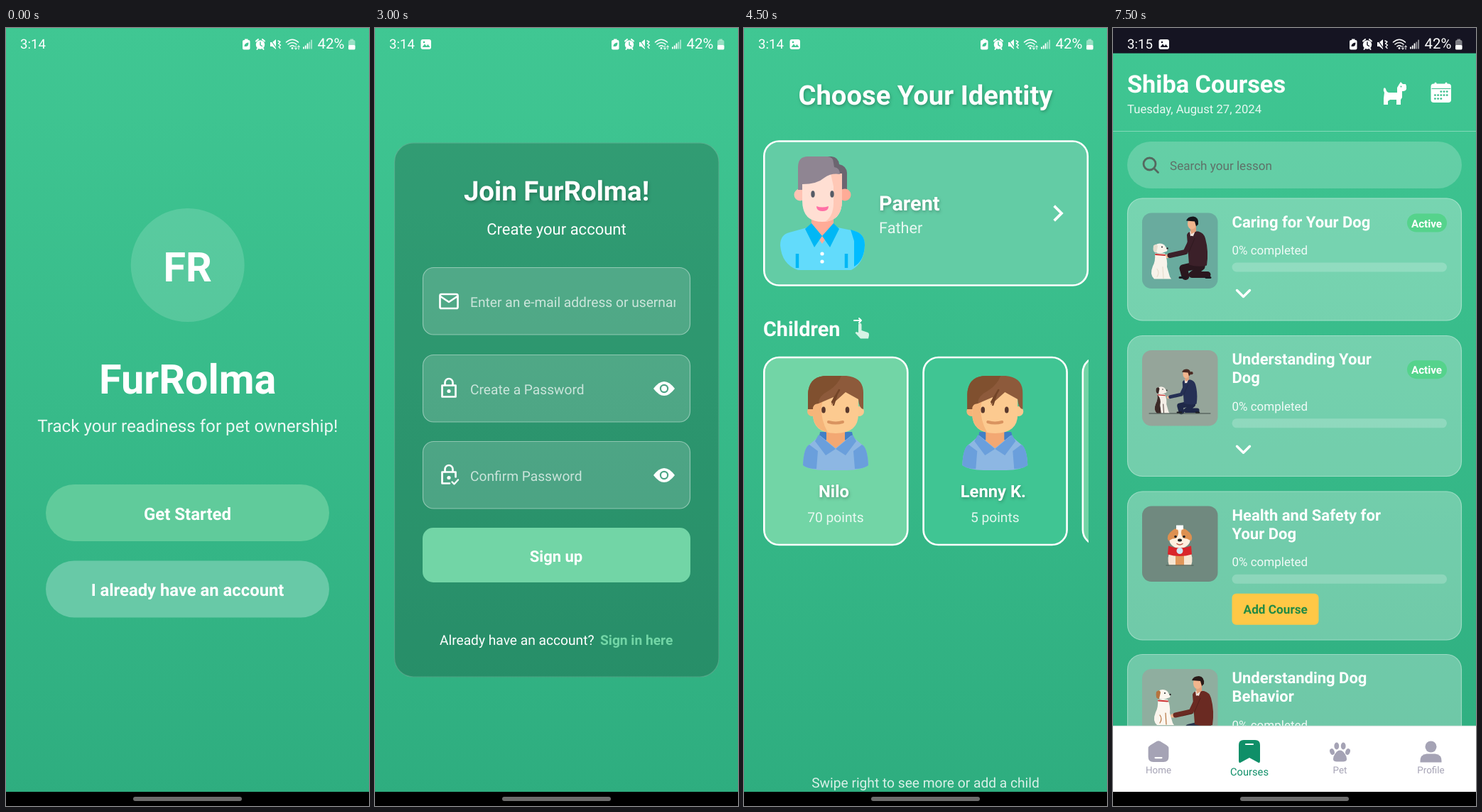
Animation, 511 px wide and 1096 px high, one loop 8 s. Source, as an HTML page:

```html
<!DOCTYPE html>
<html lang="en">
<head>
<meta charset="utf-8">
<title>Pet care app tour</title>
<style>
html, body { margin: 0; height: 100%; overflow: hidden; background: #000; }
svg { display: block; width: 100vw; height: 100vh; }
text { font-family: Roboto, sans-serif; text-rendering: geometricPrecision; white-space: pre; }
.soft { filter: drop-shadow(1px 2px 2px rgba(0,0,0,.25)); }
.lift { filter: drop-shadow(0 2px 3px rgba(0,0,0,.3)); }
</style>
</head>
<body>
<svg viewBox="0 0 511 1096">
  <defs>
    <linearGradient id="bg" x1="0" y1="0" x2="0" y2="1">
      <stop offset="0" stop-color="#40c793"/><stop offset="1" stop-color="#2ead7f"/>
    </linearGradient>
    <clipPath id="row"><rect y="440" width="485" height="300"/></clipPath>
    <clipPath id="field"><rect x="134" y="337" width="289" height="95"/></clipPath>
  </defs>
  <rect width="511" height="1096" fill="url(#bg)"/>
  <g id="screen"></g>
  <rect y="1076" width="511" height="20"/>
  <rect x="179" y="1083" width="153" height="6" rx="3" fill="#6c6c6c"/>
</svg>
<script>
const SCREEN_MS = 1500, LOOP_MS = 8000;
const APP = 'FurRolma', KID = 'Nilo', FRIEND = 'Lenny K.';
const WHITE = '#fff', MINT = '#72d5a6', BLUE = '#0a7ae6', GREEN = '#34c759', ORANGE = '#ff9500';
const veil = a => `rgba(255,255,255,${a})`;

// Drawing helpers, each returning SVG markup
const text = (x, y, s, size, weight = 400, fill = WHITE, anchor = 'start', extra = '') =>
  `<text x="${x}" y="${y}" font-size="${size}" font-weight="${weight}" fill="${fill}" text-anchor="${anchor}" ${extra}>${s}</text>`;
const mid = (x, y, s, size, weight, fill, extra) => text(x, y, s, size, weight, fill, 'middle', extra);
const rect = (x, y, w, h, r, fill, extra = '') =>
  `<rect x="${x}" y="${y}" width="${w}" height="${h}" rx="${r}" fill="${fill}" ${extra}/>`;
const circle = (x, y, r, fill, extra = '') => `<circle cx="${x}" cy="${y}" r="${r}" fill="${fill}" ${extra}/>`;
const oval = (x, y, rx, ry, fill, extra = '') =>
  `<ellipse cx="${x}" cy="${y}" rx="${rx}" ry="${ry}" fill="${fill}" ${extra}/>`;
const shape = (d, fill = WHITE, extra = '') => `<path d="${d}" fill="${fill}" ${extra}/>`;
const line = (d, color = WHITE, width = 3, cap = 'round') =>
  `<path d="${d}" fill="none" stroke="${color}" stroke-width="${width}" stroke-linecap="${cap}" stroke-linejoin="${cap === 'round' ? cap : 'miter'}"/>`;
const border = (color, width = 1.2) => `stroke="${color}" stroke-width="${width}"`;
const at = (x, y, s, scale = 1) => `<g transform="translate(${x} ${y}) scale(${scale})">${s}</g>`;

function statusBar(clock, picture = true, dark = false) {
  const ink = dark ? '#151422' : '#3fc592';
  return (dark ? rect(0, 0, 511, 35.6, 0, ink) : '') + text(20, 29.3, clock, 18.6) +
    (picture ? rect(64.5, 16, 14.5, 14, 3, WHITE) + shape('M66.5 27l3.5-4.5 2.5 3 2-2.5 3 4z', ink) + circle(69, 20, 1.3, ink) : '') +
    rect(333, 17, 10.5, 13.5, 2, WHITE) + rect(336, 15.5, 4.5, 2, 0, WHITE) + shape('M335.5 26q0-5 6-5.5q0 6-4.5 5.5z', ink) +
    circle(358, 23.5, 6.2, WHITE) + line('M352 18.5l3-2.5M364 18.5l-3-2.5M353.5 30l1.5-2M362.5 30l-1.5-2', WHITE, 2) +
    line('M358 20v4l2.5 1.5', ink, 1.4) +
    shape('M372 20h3l5-4v14l-5-4h-3z') + line('M372 16l9 13', ink, 1.2) + line('M383 18l3 1.5-2.5 2.5 3 2-2.5 2.5 2 2', WHITE, 1.4) +
    line('M394.5 20q8.5-7.5 17 0M397 23q6-5 12 0M400 26q3-2.5 6 0', WHITE, 1.6) + circle(403, 28.5, 1.4, WHITE) +
    line('M408 25v5m-1.5-1.5l1.5 1.5 1.5-1.5M412 30v-5m-1.5 1.5l1.5-1.5 1.5 1.5', WHITE, 1) +
    [3, 5, 8, 10, 13].map((h, i) => rect(418 + i * 2.8, 29.5 - h, 1.8, h, .5, i < 3 ? WHITE : veil(.55))).join('') +
    text(438.5, 29.3, '42%', 20.4) + rect(482, 17, 9.5, 13, 2, veil(.45)) + rect(484.5, 15.5, 4.5, 2, 0, veil(.45)) +
    rect(482, 24, 9.5, 6.5, 1.5, WHITE);
}

// Sign-in and sign-up forms
const eye = y => shape(`M392 ${y}q15-20 30 0q-15 20-30 0z`) + circle(407, y, 6.2, '#4ea586') + circle(407, y, 4, WHITE);
const mail = y => rect(91.5, y - 10, 25, 20, 2, 'none', border(WHITE, 2.7)) + line(`M92 ${y - 7}l12 8 12-8`, WHITE, 2.7);
const lock = (y, checked) =>
  line(checked ? `M105 ${y + 11.5}h-10.5v-16h19v7` : `M94.5 ${y - 4.5}h19v16h-19z`, WHITE, 2.7) +
  line(`M98.5 ${y - 5}v-3.5a5.5 5.5 0 0 1 11 0v3.5`, WHITE, 2.7) + circle(104, y + 3.5, 2.6, WHITE) +
  (checked ? line(`M108.5 ${y + 9.5}l3 3 5.5-6`, WHITE, 2.4) : '');
const field = (y, icon, label, secret) =>
  rect(67.5, y + .5, 376, 94.5, 15, veil(.16), border(veil(.42))) + icon +
  text(134, y + 55.5, label, 19.2, 400, veil(.7)) + (secret ? eye(y + 48) : '');
const panel = (top, bottom, title, subtitle) =>
  rect(27, top, 457.5, bottom - top, 27, 'rgba(0,0,0,.2)') +
  rect(27.5, top + .5, 456.5, bottom - top - 1, 26.5, 'none', border(veil(.18))) +
  mid(255.5, top + 81.5, title, 38.4, 700, WHITE, 'class="soft"') + mid(255.5, top + 129.5, subtitle, 22);
const bigButton = (y, label) => rect(67, y, 377, 77, 15, MINT) + mid(255, y + 48, label, 22, 700);

const welcome = () => statusBar('3:14', false) +
  circle(255.7, 334, 80, veil(.15)) + mid(255.7, 357, 'FR', 57.5, 700) +
  mid(255.7, 515, APP, 57.5, 700) + mid(255.7, 569, 'Track your readiness for pet ownership!', 24.2, 400, veil(.9)) +
  rect(56, 643, 399, 80, 40, '#60cb9b') + mid(255.5, 693, 'Get Started', 24, 700) +
  rect(56, 750.5, 399, 80, 40, '#68c9a7') + mid(255.5, 800, 'I already have an account', 23.8, 700);

const signIn = () => statusBar('3:14') + panel(158.5, 917, 'Welcome Back!', 'Sign in to your account') +
  field(334, mail(382), 'E-mail address or username') + field(457, lock(505), 'Password', true) +
  text(444, 599, 'Forgot your password?', 19.1, 700, MINT, 'end') + bigButton(632, 'Sign in') +
  rect(67, 756, 377, 55, 15, '#6bb197') + mid(255.5, 791, 'DEBUG: Quick Sign In', 16.6, 700) +
  text(251, 872, `New to ${APP}?`, 19.2, 400, WHITE, 'end') + text(258, 872, 'Create an account', 19.2, 700, MINT);

const signUp = () => statusBar('3:14') + panel(161.5, 914.5, `Join ${APP}!`, 'Create your account') +
  field(337, mail(385), '') +
  text(134, 392.5, 'Enter an e-mail address or username', 19.2, 400, veil(.7), 'start', 'clip-path="url(#field)"') +
  field(460, lock(508), 'Create a Password', true) + field(582, lock(630, true), 'Confirm Password', true) +
  bigButton(704, 'Sign up') + text(91, 869, 'Already have an account?', 19.2) + text(317, 869, 'Sign in here', 19.2, 700, MINT);

// Family picker
const father = () =>
  shape('M118 181h5q10 1 11 11q10 2 11 12v24h-27z', '#6b6570') +
  circle(79, 235, 8.5, '#ffc3b3') + circle(142, 235, 8.5, '#ffab97') +
  shape('M95 262h31v18l12 12-28 18-27-18 12-12z', '#ffab97') +
  shape('M82 205h56v38q0 30-28 30t-28-30z', '#ffdfd3') + shape('M122 205h16v38q0 27-24 30q13-8 12-30v-20z', '#ffc8b6') +
  shape('M76 228v-32q0-15 14-15h28q8 1 8 9l1 6q8 1 8 10-12-2-22 5-10 9-31 9v8z', '#8f8592') +
  oval(97, 234, 2.7, 4.7, '#565b66') + oval(124, 234, 2.7, 4.7, '#565b66') +
  shape('M102 251q8 3 17 0q0 7-8.5 7t-8.5-7z', '#ff6fa5') +
  shape('M51 306q0-15 13-18l29-8 17 24 17-24 29 6q14 4 14 20-1 26-19 35H76q-23-8-25-35z', '#62dbfb') +
  shape('M150 284l6 2q14 4 14 20-1 20-12 28l-3 2V300z', '#00bcff') +
  shape('M95 275l15 18-11 16-13-26zM126 275l-16 18 11 16 13-26z', '#00b7f5') +
  line('M75 318v20M144 318v20', '#00b7f5', 4.5, 'butt') + circle(110, 318, 2.6, WHITE) + circle(110, 329, 2.6, WHITE);

const boy = () =>
  shape('M105 582l2-13h45l3 13-26 20z', '#417fc6') + shape('M116 562h26v18l7 7-20 12-20-12 7-7z', '#f3a873') +
  circle(96, 540, 7, '#f5b57a') + circle(162, 540, 7, '#fbc88f') +
  shape('M97 512h64v32q0 27-32 27t-32-27z', '#fcca90') + shape('M97 512h16l-4 22q-1 18 9 36-21-6-21-26z', '#f5b57a') +
  shape('M90 537v-21q1-26 27-26h27q24 2 24 24v23q-6-1-7-14l-18-10-20 18 3-11-21 9q-9 0-9 8z', '#8d5a3b') +
  shape('M90 537v-21q1-26 27-26h20q-5 13-18 21-15 8-14 18-8 0-8 8z', '#80502f') +
  line('M126 531l5-16M124 527l10-17', '#734528', 2.5) +
  oval(112, 538, 2.8, 4.6, '#59392d') + oval(145.5, 538, 2.8, 4.6, '#59392d') + line('M119 555q10 3 20 0', '#d9935f', 4) +
  shape('M83 616q1-25 10-30l14-12 22 18 22-18 14 12q9 5 10 30-10 7-30 7h-32q-20 0-30-7z', '#8db7e3') +
  shape('M83 616q1-25 9-29l12 9-2 25q-13 0-19-5zM175 616q-1-25-9-29l-12 9 2 25q13 0 19-5z', '#6a9fdc') +
  shape('M105 573l24 20-14 9-15-20zM153 573l-24 20 14 9 15-20z', '#6a9fdc');

const childCard = (x, fill, name, points) => at(x, 0,
  rect(28.3, 464, 202, 264, 21, fill, border(WHITE, 2.6)) + (name ? boy() +
  mid(126.5, 661, name, 23.8, 700, WHITE, 'class="soft"') + mid(129, 696, points, 19.2, 400, veil(.85)) : ''));

const family = () => statusBar('3:14') + mid(255.5, 108, 'Choose Your Identity', 38.2, 700, WHITE, 'class="soft"') +
  rect(28.3, 159.5, 455.5, 203, 21, '#63cca5', border(WHITE, 2.6)) + father() +
  text(190, 257, 'Parent', 28.8, 700, WHITE, 'start', 'class="soft"') + text(190, 289, 'Father', 21.7, 400, veil(.85)) +
  line('M438 252l9 9-9 9', WHITE, 3.8, 'square') + text(27, 434, 'Children', 28.8, 700) +
  line('M155 412h10m-3-3l3 3-3 3', WHITE, 2) +
  shape('M161 418q0-2.5 2.2-2.5t2.3 2.5v8l9 3q2 1 1.5 4l-1 4.5h-11l-7.5-8 1.5-1.5 3 1z', '#d6f3e5') +
  `<g clip-path="url(#row)">${childCard(0, MINT, KID, '70 points') + childCard(224.3, '#40c593', FRIEND, '5 points') + childCard(448.6, MINT)}</g>` +
  mid(255.5, 1070, 'Swipe right to see more or add a child', 19.2, 400, veil(.82));

// Shared frame of the main tabs
function header(title) {
  const hole = '#3dbf8e';
  let dots = '';
  for (let day = 2; day < 13; day++) dots += circle(453.4 + day % 5 * 4.2, 89.6 + Math.floor(day / 5) * 5, 1.4, hole);
  return statusBar('3:15', true, true) + text(20, 91, title, 34.3, 700) + text(20, 120, 'Tuesday, August 27, 2024', 16.7, 400, veil(.88)) +
    shape('M381 85q2-2 3 1 1 5 5 5h11v-7l3-5 2-3 3 3h4l1 3v4q-1 3-5 3h-1v9l-2 3v7h-6v-7h-9l-3 2v5h-6v-9l1-8q-2-3-1-6z') +
    circle(405.5, 82.5, 1, hole) +
    rect(447.5, 78.5, 28.5, 26.5, 4, WHITE) + line('M454 78v3M469 78v3', WHITE, 3) + line('M449 85.5h26', hole, 1) + dots +
    line('M0 145.5h511', veil(.35), 1.2);
}
const tabs = [
  ['Home', 64, 'M-16-5q0-3 3-5l10-6q3-2 6 0l10 6q3 2 3 5v13q0 8-8 8H-8q-8 0-8-8z'],
  ['Courses', 192, 'M-15-9q0-7 7-7H8q7 0 7 7v22q0 5-4 2L0 9l-11 6q-4 3-4-2z'],
  ['Pet', 319.5, 'M0-2q5 0 9 9 2 7-4 7h-10q-6 0-4-7 4-9 9-9z'],
  ['Profile', 447.5, 'M-15 15v-2q0-9 9-10h12q9 1 9 10v2z'],
];
function navBar(active) {
  return rect(0, 983, 511, 93, 0, WHITE) + line('M0 983.3h511', '#d9e5e0', 1) + tabs.map(([name, x, d], i) => {
    const on = i === active, color = on ? '#0f8f68' : '#a5a3b5';
    const details = [
      line('M-5 9.5h10', WHITE, 2.4), line('M-5-10h10', WHITE, 2.2),
      oval(-11, 0, 3.2, 4.5, color, 'transform="rotate(-20 -11 0)"') + oval(11, 0, 3.2, 4.5, color, 'transform="rotate(20 11 0)"') +
        oval(-4.7, -8, 3.4, 5, color) + oval(4.7, -8, 3.4, 5, color),
      circle(0, -7, 8, color),
    ];
    return at(x, on ? 1019 : 1019.5, shape(d, color) + details[i], on || i > 1 ? 1 : .9) +
      mid(x, on ? 1053 : 1050, name, on ? 14.7 : 13.4, 400, color);
  }).join('');
}

// Home tab
const badge = (x, y, kind, extra = '') => at(x, y, {
  done: circle(0, 0, 30, GREEN, extra) + circle(0, 0, 17.5, WHITE) + line('M-8 1l6 6L8-7', GREEN, 2.8),
  wait: circle(0, 0, 30, ORANGE, extra) + circle(0, 0, 18.5, WHITE) + line('M0-11V1h8', ORANGE, 2.6, 'butt'),
  star: circle(0, 0, 30, '#ffd60a', extra) +
    shape('M' + Array.from({ length: 10 }, (_, i) => {
      const r = i % 2 ? 8.5 : 20, a = i * Math.PI / 5;
      return `${(r * Math.sin(a)).toFixed(1)} ${(1 - r * Math.cos(a)).toFixed(1)}`;
    }).join('L') + 'z', WHITE, 'stroke="#fff" stroke-width="2" stroke-linejoin="round"'),
}[kind]);
const stat = (x, kind, count, label) => rect(x - 76.5, 168, 153.5, 188, 22, 'rgba(0,0,0,.2)', border(veil(.38))) +
  badge(x, 220, kind) + mid(x, 292, count, 29, 700) + mid(x, 329, label, 16.8, 700);

function task(y, h, kind, title, time, lines, tint, icon) {
  const tile = y + (title.length > 1 ? 114 : 88);
  return rect(48, y, 442, h, 27, WHITE, 'class="lift"') +
    title.map((s, i) => text(89, y + 44 + i * 26.5, s, 22, 700, '#2c2c2e')).join('') +
    text(470, y + (title.length > 1 ? 56 : 43), time, 17, 500, BLUE, 'end') +
    lines.map((s, i) => text(182, tile + 20 + i * 21.3, s, 18.3, 400, '#444')).join('') +
    rect(94, tile, 66.5, 66.5, 13, tint) + at(127, tile + 33, icon) +
    mid(126.5, tile + 90, '+5', 16.8, 700, BLUE) + badge(52, y + h / 2, kind, 'class="lift"');
}
const toilet = shape('M-12-16H12v3H10v10h-20v-10h-2zM-12-1q12-4 24 0 0 9-6 11l2 7H-8l2-7q-6-2-6-11z', '#4a90e2') +
  oval(0, 0, 8.5, 2, '#e8f0fc') + line('M-7-12.5h4', '#e8f0fc', 1.5);
const bowl = shape('M-16-2q-1-5 4-6 1-4 5-4 4-4 7-1 5-3 7 1 5 0 5 4 5 1 4 6zM-16 1h33q-1 9-9 12l-1 2H-6l-1-2q-8-3-9-12z', '#f5a623');

const home = () => header(`Hello, ${KID} !`) +
  stat(98.5, 'done', '2', 'Completed') + stat(255.5, 'wait', '7', 'Remaining') + stat(412.5, 'star', '70', 'Points') +
  text(22, 409.5, "Today's Tasks", 23.8, 700) + text(22, 448, '* suggested', 16.8, 400, veil(.85)) +
  rect(453, 379, 120, 60, 30, veil(.22)) + line('M487 400l-9.5 9.3 9.5 9.3', WHITE, 3) +
  task(467, 234, 'wait', ['Morning Potty Break', '(Restroom)'], '8:00 AM *',
    ['Take the dog out to pee in the', 'backyard. Make sure to clean up', 'after.'], '#e8f0fc', toilet) +
  task(727.5, 208, 'done', ['Meal Prep (Shop)'], '8:05 AM *',
    ["Buy food and prepare the dog's", 'meal in the kitchen.'], '#fdf3e1', bowl) +
  rect(48, 962, 442, 100, 27, WHITE, 'class="lift"') + navBar(0);

// Courses tab; thumbnail art uses a 106-unit square
const sittingDog = (coat, patch) =>
  shape('M17 93q-7-6-2-18 4-7 3-18h14q4 9 3 19l4 14 2 3z', coat) + line('M29 76l1 16M21 90q4-6 0-11', patch, 1.2) +
  oval(25, 50, 8.5, 7, coat) + shape('M30 47l6 3-1 4-6 2z', coat) + shape('M16 46q5-4 6 1l-2 9q-6 0-4-10z', patch) +
  circle(35.5, 50, 1.2, '#222') + circle(28, 48, 1, '#222') + line('M19 58.5l13 1', '#c33', 2);
const kneeling = (suit, legs, hair) =>
  line('M84 72l-26 6 3 11', legs, 11) + line('M84 76l-14 11h22', legs, 9) + line('M53 91h8M90 91h6', '#1b1a20', 3) +
  shape('M63 31q1-4 6-5l10 0q8 2 10 10 5 18 2 38-12 3-25-1z', suit) + shape('M67 26l8-1-6 15z', '#f1e6df') +
  circle(35, 61, 2.8, '#f1b58d') + line('M70 36l-9 19-22 5', suit, 7) + line('M74 36l-9 21-16 4', 'rgba(0,0,0,.2)', 1) +
  shape('M67 17h9v9l-7 4z', '#e3a37c') + oval(70, 15, 6, 8, '#f1b58d') + shape('M62 11q2-6 10-6 8 1 7 11l-3 3-2-7z', hair);
const frontDog =
  shape('M41 60h25q7 12 3 24H38q-4-12 3-24z', '#f6e6d2') + shape('M47 66h12v18H47z', '#e0975a') +
  shape('M39 41q3-9 14-9t14 9q4 16-14 19-18-3-14-19z', '#fff0df') +
  shape('M43 34q8-6 8 4-1 9-8 8l-6 3q-4-8 6-15zM63 34q-8-6-8 4 1 9 8 8l6 3q4-8-6-15z', '#dd9050') + shape('M48 27h10v6H48z', WHITE) +
  circle(47, 43, 1.8, '#222') + circle(59, 43, 1.8, '#222') + oval(53, 48, 3, 2, '#222') + line('M49 53q4 3 8 0', '#b54', 1.5) +
  shape('M37 56q16 6 32 0l1 12q-17 5-34 0z', '#d9252a') + circle(53, 63, 4.5, '#cfe6f5') + line('M34 83.5h38', '#576b62', 1.5);
const art = [
  kneeling('#3b2029', '#2a171e', '#16151a') + sittingDog('#f7f3ea', '#e6ddce'),
  at(12, 23, kneeling('#263055', '#1f2848', '#4a2a22') + circle(81, 13, 3, '#4a2a22'), .71) +
    at(8, 19, sittingDog('#f4eee6', '#3b2a27') + shape('M17 93q-7-6-2-18 4-7 3-17 8 8 5 20l2 15z', '#3b2a27'), .75) + line('M10 89h86', '#3d4944', 1),
  frontDog,
  at(8, 5, kneeling('#6a2a22', '#25324a', '#2a1a18')) + at(4, -14, sittingDog('#fbf6ee', '#b5733f')),
];
const thumbTints = ['#69ab9e', '#95a59a', '#70897f', '#8fae9f'];
function course(i, y, h, title, active) {
  const low = y + (title.length - 1) * 26.3;
  return rect(20, y, 471, h + 1, 21.5, veil(.3)) + rect(20.5, y + .5, 470, h, 21, 'none', border(veil(.3))) +
    at(41, y + 21, rect(0, 0, 106.5, 106.5, 13, thumbTints[i]) + art[i]) +
    title.map((s, n) => text(167.5, y + 41 + n * 26.4, s, 22, 700)).join('') +
    text(167.5, low + 79.5, '0% completed', 17, 400, veil(.9)) + rect(167.5, low + 91, 302.5, 13, 6.5, veil(.2)) +
    (active
      ? rect(414, y + 22 + (low - y) / 2, 56, 26, 13, '#55d38c') + mid(441.5, y + 41 + (low - y) / 2, 'Active', 15.2, 700) +
        line(`M174.5 ${low + 130}l9 9 9-9`, WHITE, 3.4)
      : rect(167.5, low + 118, 122, 44, 6, '#ffc846') + mid(228.7, low + 146.5, 'Add Course', 17.2, 700, '#238a45'));
}
const courses = () => header('Shiba Courses') +
  rect(20, 160, 471, 66, 33, veil(.2)) + circle(51.5, 191.5, 8.5, 'none', border('#55685f', 2.8)) + line('M58 198l5.5 5.5', '#55685f', 2.8) +
  text(80, 199.5, 'Search your lesson', 17.1, 400, '#5f7169') +
  course(0, 239.5, 172, ['Caring for Your Dog'], true) + course(1, 433, 198, ['Understanding Your', 'Dog'], true) +
  course(2, 652.5, 209, ['Health and Safety for', 'Your Dog']) + course(3, 882, 209, ['Understanding Dog', 'Behavior']) + navBar(1);

const screens = [welcome, signIn, signUp, family, home, courses].map(draw => draw());
const stage = document.getElementById('screen');
let shown = -1;
function tick() {
  const index = Math.floor(performance.now() % LOOP_MS / SCREEN_MS);
  if (index !== shown) stage.innerHTML = screens[shown = index];
  requestAnimationFrame(tick);
}
tick();
</script>
</body>
</html>
```
